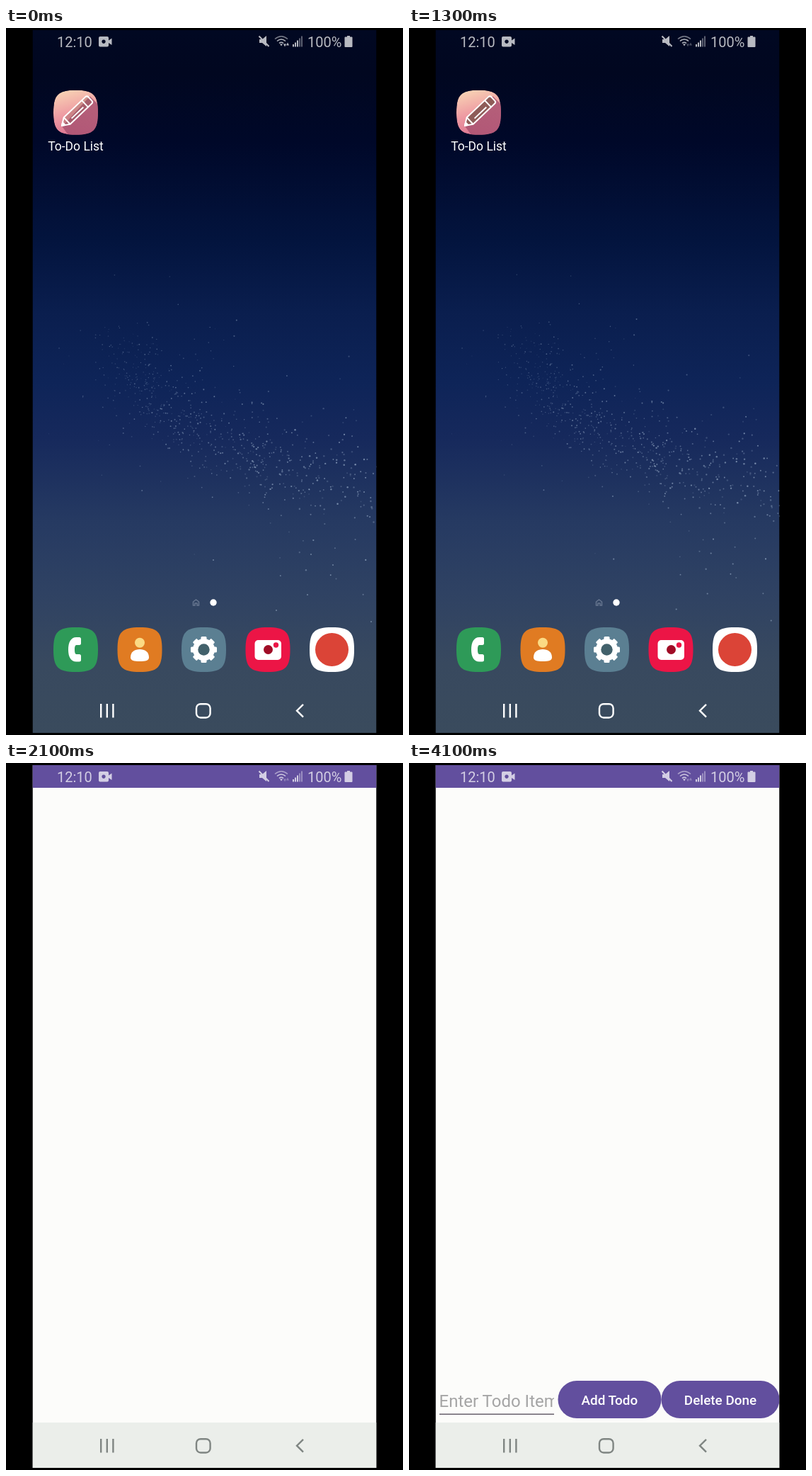
Recreate the animation shown at these times as an HTML page. Size 561x998 px, loop 4.2 s.

```html
<!DOCTYPE html>
<html lang="en">
<head>
<meta charset="utf-8">
<title>To-Do List</title>
<style>
html, body { margin: 0; width: 100%; height: 100%; overflow: hidden; background: #000; }
svg { display: block; width: 561px; height: 998px; font-family: Roboto, sans-serif; }
</style>
</head>
<body>
<svg viewBox="0 0 561 998">
  <defs>
    <linearGradient id="sky" x1="0" y1="0" x2="0" y2="1">
      <stop offset="0" stop-color="#010822"/>
      <stop offset=".06" stop-color="#010720"/>
      <stop offset=".16" stop-color="#000829"/>
      <stop offset=".3" stop-color="#03143e"/>
      <stop offset=".4" stop-color="#0a1e4e"/>
      <stop offset=".5" stop-color="#0e2458"/>
      <stop offset=".58" stop-color="#16295c"/>
      <stop offset=".7" stop-color="#263a62"/>
      <stop offset=".8" stop-color="#2f4263"/>
      <stop offset=".9" stop-color="#38495f"/>
      <stop offset="1" stop-color="#3a4b5d"/>
    </linearGradient>
    <linearGradient id="peach" x1=".3" y1="0" x2=".6" y2="1">
      <stop offset="0" stop-color="#f8d2b4"/>
      <stop offset=".5" stop-color="#ee9aa2"/>
      <stop offset="1" stop-color="#d9708f"/>
    </linearGradient>
    <linearGradient id="shade" x1="0" y1="0" x2="1" y2="1">
      <stop offset="0" stop-color="#a04868"/>
      <stop offset="1" stop-color="#b05c7a"/>
    </linearGradient>
    <path id="tile" d="M-31.5 0C-31.5-25-25-31.5 0-31.5S31.5-25 31.5 0 25 31.5 0 31.5-31.5 25-31.5 0Z"/>
    <clipPath id="tileClip"><use href="#tile"/></clipPath>
    <clipPath id="screen"><rect x="37.5" y="3" width="486" height="992"/></clipPath>
    <clipPath id="field"><rect x="40" y="880" width="165" height="38"/></clipPath>
  </defs>
  <rect width="561" height="998"/>
  <g clip-path="url(#screen)">
    <g id="wall">
      <rect x="37.5" y="3" width="486" height="992" fill="url(#sky)"/>
      <g id="stars" fill="#a9bdd6"/>
    </g>

    <g id="home">
      <g transform="translate(98.5 119.3)" clip-path="url(#tileClip)">
        <use href="#tile" fill="url(#peach)"/>
        <path d="M20-23L60 17V60H10L-19 20Z" fill="url(#shade)" opacity=".8"/>
        <g transform="rotate(-43.5)" stroke="#fff" stroke-width="2" stroke-linejoin="round">
          <path id="pencil" d="M-27 0L-17-6.5H25Q28-6.5 28-3.5V3.5Q28 6.5 25 6.5H-17Z" fill="#8e5c58"/>
          <path d="M-17-6.5V6.5M18-6.5V6.5M-10 2H13" fill="none"/>
          <path d="M-27 0l4-2.5v5z" fill="#fff"/>
        </g>
      </g>
      <text x="98.5" y="173" font-size="17.5" fill="#fff" text-anchor="middle">To-Do List</text>

      <path d="M264.5 810l4-3 4 3v5h-2.500v-3h-3v3h-2.500z" fill="none" stroke="#66758f" stroke-width="1.5"/>
      <circle cx="293" cy="811" r="4.7" fill="#fff"/>

      <g transform="translate(98.500 877.500)">
        <use href="#tile" fill="#2e9a58"/>
        <path d="M1-17.500H5a2.500 2.500 0 0 1 2.500 2.500V-9A2.500 2.500 0 0 1 5-6.500H1C-1-6.500-1.500-3.500-1.500 0S-1 6.500 1 6.500H5A2.500 2.500 0 0 1 7.500 9v5.500A2.500 2.500 0 0 1 5 17H1C-7 17-10.500 10-10.500 0S-7-17.500 1-17.500Z" fill="#fff"/>
      </g>
      <g transform="translate(189 877.500)">
        <use href="#tile" fill="#e07b22"/>
        <circle cy="-9.700" r="7" fill="#fbda84"/>
        <path d="M-13 11C-13 3-7-.5 0-.5S13 3 13 11C13 15.500 8 16.500 0 16.500S-13 15.500-13 11Z" fill="#fff"/>
      </g>
      <g id="gear" transform="translate(279.500 877.500)">
        <use href="#tile" fill="#5b7f92"/>
        <circle r="15.500" fill="#fff"/>
        <circle r="8.200" fill="#42616b"/>
      </g>
      <g transform="translate(370 877.500)">
        <use href="#tile" fill="#ec1546"/>
        <rect x="-18.500" y="-13.500" width="37.500" height="28" rx="5" fill="#fff"/>
        <circle cx=".5" r="6.500" fill="#a00c26"/>
        <circle cx="11.500" cy="-6.500" r="3.700" fill="#ec1546"/>
      </g>
      <g transform="translate(460.500 877.500)">
        <use href="#tile" fill="#fff"/>
        <circle r="23.500" fill="#db4437"/>
      </g>
    </g>

    <g id="app">
      <rect width="486" height="992" fill="#fcfcfa"/>
      <rect width="486" height="32" fill="#624f9e"/>
      <rect y="928" width="486" height="64" fill="#ebeeea"/>
    </g>

    <g id="form">
      <text x="42.500" y="909" font-size="24" fill="#a5a5a5" clip-path="url(#field)">Enter Todo Item</text>
      <path d="M43 919.300H205" stroke="#68606c" stroke-width="1.600"/>
      <g fill="#624f9e">
        <rect x="210.500" y="872" width="146" height="53" rx="26.500"/>
        <rect x="356.500" y="872" width="167" height="53" rx="26.500"/>
      </g>
      <g font-size="18.900" font-weight="500" fill="#fff" text-anchor="middle">
        <text x="283.300" y="906">Add Todo</text>
        <text x="440" y="906">Delete Done</text>
      </g>
    </g>

    <g id="status" fill="#fff" opacity=".72">
      <text x="72" y="27" font-size="20">12:10</text>
      <text x="426" y="27" font-size="20">100%</text>
      <path fill-rule="evenodd" d="M133 12H143Q145 12 145 14V17.500L149.500 14.500V24L145 21V24.500Q145 26.500 143 26.500H133Q131 26.500 131 24.500V14Q131 12 133 12ZM138 16.500a2.700 2.700 0 1 0 .01 0Z"/>
      <path d="M358 16h4l6-5v15l-6-5h-4z"/>
      <path d="M357.500 11.500L371.500 26" stroke="#fff" stroke-width="2"/>
      <g fill="none" stroke="#fff" stroke-width="1.600">
        <path d="M380 15.500Q389 8 398 15.500" opacity=".65"/>
        <path d="M383 18.500Q389 13.500 395 18.500M386 21.500Q389 19 392 21.500"/>
      </g>
      <path d="M387 22.500h4l-2 3z"/>
      <path id="down" d="M392 22.500h4l-2 4z"/>
      <path id="up" d="M396 24.500h4l-2-4z"/>
      <path d="M405 23h2v3.500h-2zM408 20.500h2v6h-2zM411 17.500h2v9h-2z"/>
      <path d="M414 14.500h2v12h-2zM417 11.500h2v15h-2z" opacity=".5"/>
      <path d="M482 11h4v1.500h2.500q1 0 1 1V26q0 1-1 1h-9q-1 0-1-1V13.500q0-1 1-1H482z"/>
    </g>

    <g id="nav" fill="none" stroke-width="2.400">
      <path d="M134.200 954V973.500M142.800 954V973.500M151.400 954V973.500"/>
      <rect x="269" y="954.200" width="19.600" height="19.300" rx="6"/>
      <path d="M420 954.800L411 963.700 420 972.600"/>
    </g>
  </g>
</svg>
<script>
const LOOP = 4200, STEP = 100;
const $ = id => document.getElementById(id);
const clamp = v => Math.max(0, Math.min(1, v));
const mix = (a, b, p) => a + (b - a) * p;
const set = (el, attrs) => { for (const k in attrs) el.setAttribute(k, attrs[k]); };
const show = (id, on) => set($(id), { visibility: on ? 'visible' : 'hidden' });

function add(parent, tag, attrs) {
  const el = document.createElementNS('http://www.w3.org/2000/svg', tag);
  set(el, attrs);
  return parent.appendChild(el);
}

let seed = 71;
const rnd = () => (seed = seed * 16807 % 2147483647) / 2147483647;
const bell = () => (rnd() + rnd() + rnd() + rnd() - 2) * 1.7;

for (let i = 0; i < 8; i++) {
  add($('gear'), 'rect', { x: -4, y: -18.5, width: 8, height: 7, rx: 1.5, fill: '#fff', transform: `rotate(${i * 45})` });
}

const stars = [];
function star(x, y, r, opacity) {
  stars.push({ x, y, el: add($('stars'), 'circle', { r, opacity }) });
}

// Dust follows a curved band, finer and dimmer towards its upper left end.
for (let i = 0; i < 760; i++) {
  const u = rnd(), v = 1 - u;
  const wide = rnd() < .3 ? 66 : 26;
  const x = v * v * 165 + 2 * u * v * 220 + u * u * 535 + bell() * wide * .8;
  const y = v * v * 455 + 2 * u * v * 590 + u * u * 655 + bell() * wide;
  star(x, y, .45 + u * .5 + rnd() * .4, (.15 + .55 * rnd()) * (.55 + .45 * u));
}
[[382, 822], [426, 800], [516, 838], [293, 751], [431, 743], [462, 758]]
  .forEach(([x, y]) => star(x, y, 1.1, .5));

function draw(t) {
  const p = 1 - (1 - clamp((t - 1350) / 268)) ** 3;
  const open = p === 1;

  show('wall', !open);
  show('home', !open);
  if (!open) {
    const sway = Math.sin(Math.PI * t / 1480);
    for (const s of stars) {
      const near = clamp((s.x - 100) / 220);
      set(s.el, { cx: s.x - 11.5 * sway * near, cy: s.y - 4 * sway * near });
    }
    const zoom = 1 + .22 * p;
    set($('wall'), { transform: `translate(${280 * (1 - zoom)} ${-50 * p + 3 * (1 - zoom)}) scale(${zoom})` });
    set($('home'), { transform: `translate(98 142) scale(${1 + .47 * p}) translate(-98 -142)` });
    set($('pencil'), { 'fill-opacity': .35 + .65 * clamp(t / 300) });
  }

  show('app', p > 0);
  set($('app'), {
    transform: `translate(${mix(90, 37.5, p)} ${mix(120, 3, p)}) scale(${mix(.1, 1, p)})`,
    opacity: Math.min(1, p * 1.05)
  });
  show('form', t >= 2400);

  const busy = t < 1000, loading = t >= 2400 && t < 3000;
  set($('down'), { opacity: busy || loading ? 1 : .4 });
  set($('up'), { opacity: busy ? 1 : .4 });
  set($('nav'), { stroke: open ? '#7f8582' : '#fff' });
}

let last = -1;
const start = performance.now();
function tick(now) {
  const t = Math.floor(Math.max(0, now - start) % LOOP / STEP) * STEP;
  if (t !== last) draw(last = t);
  requestAnimationFrame(tick);
}
draw(0);
requestAnimationFrame(tick);
</script>
</body>
</html>
```
